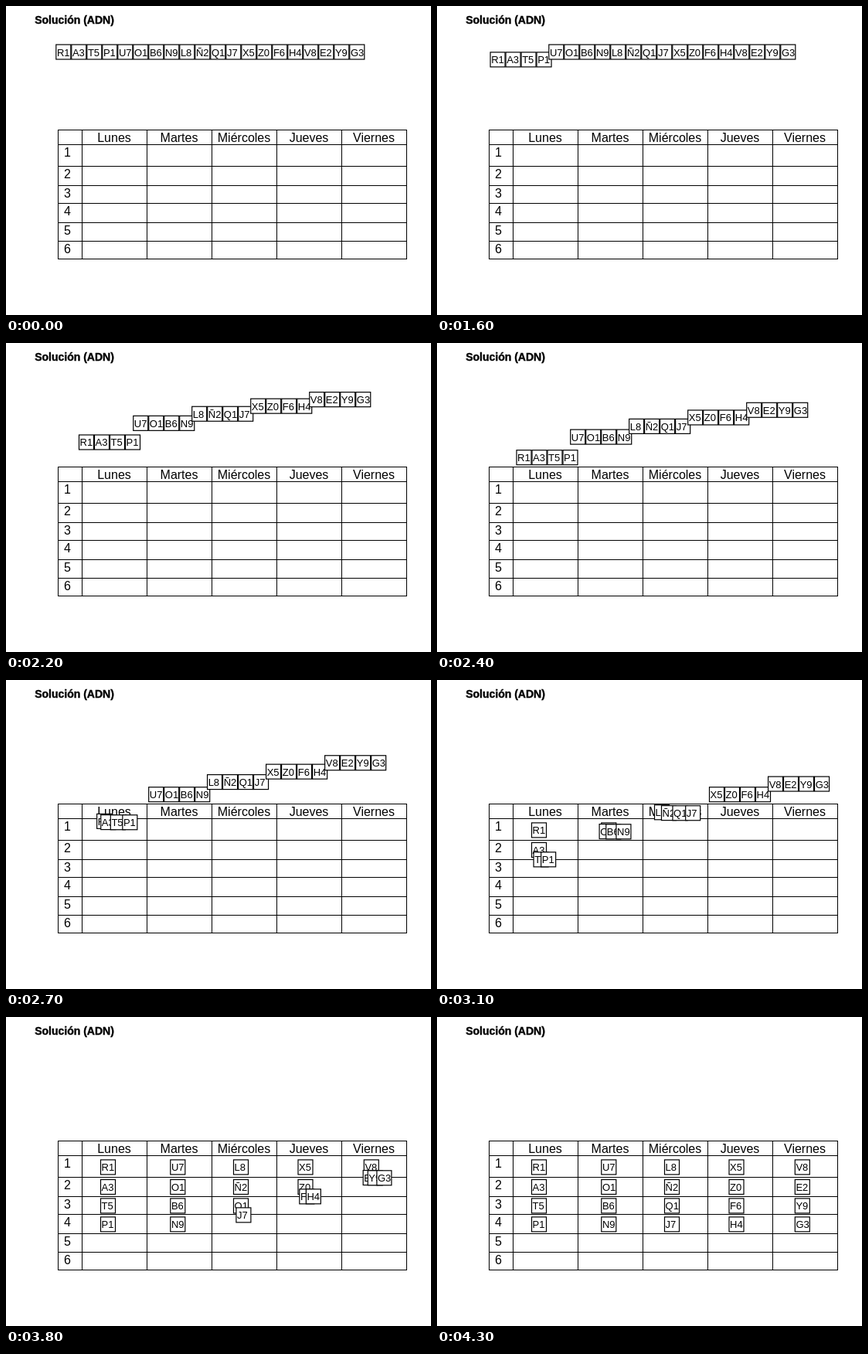
An HTML page for the animation above (5.1 s loop, 550x400 px).

```html
<!DOCTYPE html>
<html lang="es">
<head>
<meta charset="utf-8">
<title>Solución (ADN)</title>
<style>
  html, body { margin: 0; width: 100%; height: 100%; overflow: hidden; background: #fff; }
  svg { display: block; width: 550px; height: 400px; font: 16px "Liberation Sans", Arial, sans-serif; }
  .title { font-weight: bold; font-size: 14px; stroke: #000; stroke-width: .4px; }
  .grid { stroke: #000; fill: none; shape-rendering: crispEdges; }
  .mid { text-anchor: middle; }
  .tile rect { fill: #fff; stroke: #000; stroke-width: 1.2px; }
  .tile text { font-size: 13px; }
</style>
</head>
<body>
<svg id="stage" viewBox="0 0 550 400"></svg>
<script>
const LOOP = 5100, HOLD = 1600, STEP = 100, LAST = 28;
const COLS = [67, 98, 182, 266, 350, 434, 518];
const ROWS = [160, 179, 207, 232, 255, 280, 304, 327];
const DAYS = ['Lunes', 'Martes', 'Miércoles', 'Jueves', 'Viernes'];
const TILE = 20, ROW_X = 64.3, ROW_Y = 49.5, SPLIT_Y = 138.2;
const CELL_Y = [184.4, 210, 234.4, 258.4];

// Each group slides as one strip, then its tiles part towards their cells.
const GROUPS = [
  { labels: 'R1 A3 T5 P1', start: 0, split: 9,  splitX: 102.5, cellX: 122 },
  { labels: 'U7 O1 B6 N9', start: 2, split: 12, splitX: 184.2, cellX: 212.3 },
  { labels: 'L8 Ñ2 Q1 J7', start: 3, split: 14, splitX: 268, cellX: 294 },
  { labels: 'X5 Z0 F6 H4', start: 4, split: 16, splitX: 352, cellX: 377.5 },
  { labels: 'V8 E2 Y9 G3', start: 5, split: 18, splitX: 436, cellX: 462.8 }
];

const stage = document.getElementById('stage');

function add(parent, tag, attrs, text) {
  const el = document.createElementNS('http://www.w3.org/2000/svg', tag);
  for (const key in attrs) el.setAttribute(key, attrs[key]);
  if (text) el.textContent = text;
  return parent.appendChild(el);
}

const lerp = (a, b, k) => a + (b - a) * k;
const clamp = k => Math.max(0, Math.min(1, k));

function drawTable() {
  const left = COLS[0], right = COLS[6], top = ROWS[0], bottom = ROWS[7];
  const lines = COLS.map(x => `M${x + .5} ${top}V${bottom + 1}`)
    .concat(ROWS.map(y => `M${left} ${y + .5}H${right + 1}`));
  add(stage, 'path', { class: 'grid', d: lines.join('') });
  DAYS.forEach((day, i) =>
    add(stage, 'text', { class: 'mid', x: COLS[i + 1] + 42, y: top + 16 }, day));
  for (let n = 1; n <= 6; n++)
    add(stage, 'text', { class: 'mid', x: 79.5, y: ROWS[n] + 16 }, String(n));
}

function makeTiles() {
  return GROUPS.flatMap((group, g) => group.labels.split(' ').map((label, i) => {
    const el = add(stage, 'g', { class: 'tile' });
    add(el, 'rect', { x: .5, y: .5, width: TILE - 1, height: TILE - 1 });
    add(el, 'text', { x: 1.6, y: 15 }, label);
    return { el, group, i, homeX: ROW_X + TILE * (4 * g + i) };
  }));
}

function place({ el, group, i, homeX }, step) {
  const slide = clamp((step - group.start) / (group.split - group.start));
  const part = clamp((step - group.split) / (4 + 2 * i));
  const x = lerp(lerp(homeX, group.splitX + TILE * i, slide), group.cellX, part);
  const y = lerp(lerp(ROW_Y, SPLIT_Y, slide), CELL_Y[i], part);
  el.setAttribute('transform', `translate(${x.toFixed(2)} ${y.toFixed(2)})`);
}

add(stage, 'text', { class: 'title', x: 37.2, y: 23 }, 'Solución (ADN)');
drawTable();
const tiles = makeTiles();
const origin = performance.now();
let shown = -1;

function frame() {
  const t = (performance.now() - origin) % LOOP;
  const step = t < HOLD ? 0 : Math.min(LAST, Math.floor((t - HOLD) / STEP) + 1);
  if (step !== shown) tiles.forEach(tile => place(tile, step));
  shown = step;
  requestAnimationFrame(frame);
}
frame();
</script>
</body>
</html>
```
